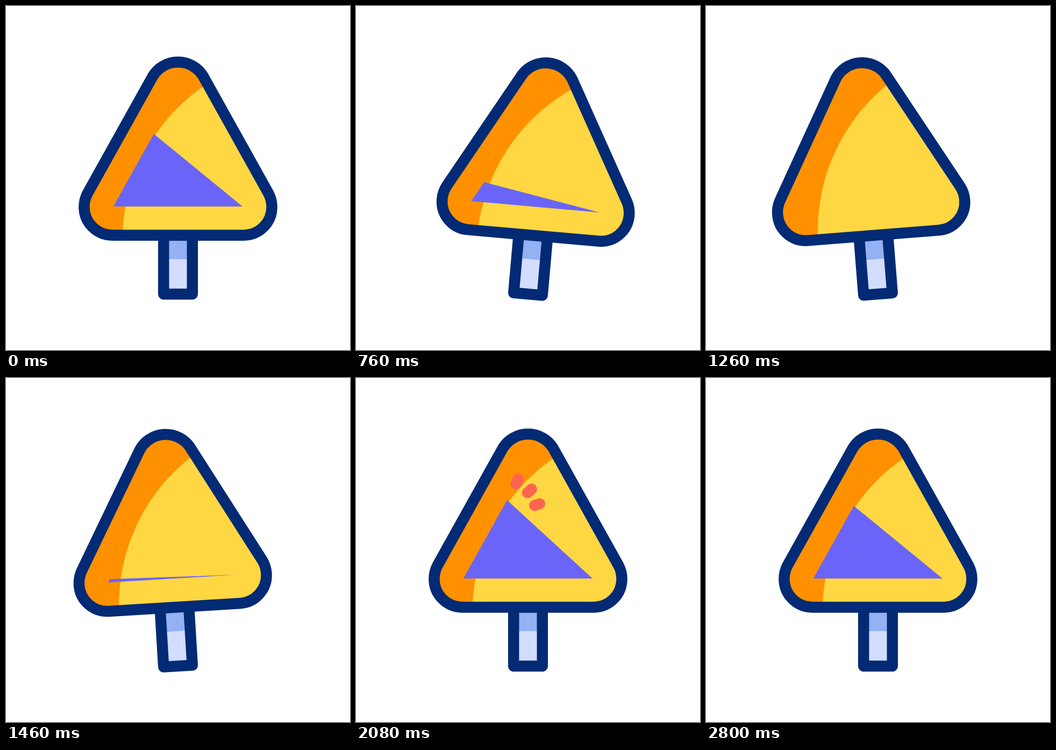
An HTML page with a canvas for the animation above (3 s loop, 640 px wide and 640 px high).

```html
<!DOCTYPE html>
<html lang="en">
<head>
<meta charset="utf-8">
<title>Hill sign</title>
<style>
  html, body { margin: 0; width: 100%; height: 100%; overflow: hidden; background: #fff; }
  canvas { display: block; width: 640px; height: 640px; }
</style>
</head>
<body>
<canvas id="stage" width="640" height="640"></canvas>
<script>
const ctx = document.getElementById('stage').getContext('2d');
const LOOP = 3000, STEP = 20, LINE = 20.5;
const NAVY = '#032a74', ORANGE = '#ff9100', YELLOW = '#ffd743', PURPLE = '#6a65f8';
const RED = '#ff6450', BLUE = '#94b1f3', PALE = '#d3ddff';
const PIVOT = { x: 320, y: 536 };

// [time, value] pairs, joined by a monotone cubic
const tilt = track([
  [100, 0], [370, 1.2], [640, 3.85], [760, 5.03], [930, 6.45], [1080, 2.22], [1180, -1.65],
  [1310, -5.35], [1460, -3.47], [1710, 2.35], [1800, 0.45], [1890, -1.65], [2060, 0]
]);
const slope = track([
  [100, 1], [430, 0.76], [760, 0.277], [1080, 0.02], [1180, 0], [1300, 0], [1460, 0.045],
  [1800, 0.433], [1940, 0.71], [2080, 1.08], [2110, 1.1], [2800, 1]
]);
const sparkTip = track([[2000, 65], [2240, 104]]);
const sparkTail = track([[2260, 65], [2520, 104]]);

function track(keys) {
  const rate = i => (keys[i + 1][1] - keys[i][1]) / (keys[i + 1][0] - keys[i][0]);
  const slopes = keys.map((key, i) => {
    if (i === 0 || i === keys.length - 1) return 0;
    const a = rate(i - 1), b = rate(i);
    return a * b > 0 ? 2 * a * b / (a + b) : 0;
  });
  return t => {
    if (t <= keys[0][0]) return keys[0][1];
    const i = keys.findIndex(key => key[0] > t) - 1;
    if (i < 0) return keys[keys.length - 1][1];
    const span = keys[i + 1][0] - keys[i][0], u = (t - keys[i][0]) / span, v = 1 - u;
    return keys[i][1] * v * v * (1 + 2 * u) + keys[i + 1][1] * u * u * (3 - 2 * u)
      + span * u * v * (slopes[i] * v - slopes[i + 1] * u);
  };
}

const board = new Path2D(
  'M273.5 130 A54.9 54.9 0 0 1 366.5 130 L488 348 Q494.6 360 494.6 374' +
  'A52.4 52.4 0 0 1 442.2 426.4 H197.8 A52.4 52.4 0 0 1 145.4 374 Q145.4 360 152 348 Z');

function drawPole() {
  ctx.fillStyle = PALE;
  ctx.fillRect(293, 426, 54, 110);
  ctx.fillStyle = BLUE;
  ctx.fillRect(293, 426, 54, 45);
  ctx.strokeStyle = NAVY;
  ctx.strokeRect(293.2, 426, 53.6, 110);
}

function drawBoard() {
  ctx.save();
  ctx.clip(board);
  ctx.fillStyle = ORANGE;
  ctx.fillRect(130, 90, 380, 350);
  ctx.fillStyle = YELLOW;
  ctx.beginPath();
  ctx.arc(566, 437, 349.5, 0, 2 * Math.PI);
  ctx.fill();
  ctx.restore();
  ctx.strokeStyle = NAVY;
  ctx.stroke(board);
}

function drawHill(size) {
  if (size <= 0) return;
  ctx.fillStyle = PURPLE;
  ctx.beginPath();
  ctx.moveTo(440, 373);
  ctx.lineTo(199.7, 373);
  ctx.lineTo(199.7 + 75.3 * size, 373 - 135 * size);
  ctx.fill();
}

function drawSparks(tail, tip) {
  if (tip - tail < 0.1) return;
  ctx.strokeStyle = RED;
  for (const degrees of [-65, -41, -17]) {
    const a = degrees * Math.PI / 180, cos = Math.cos(a), sin = Math.sin(a);
    ctx.beginPath();
    ctx.moveTo(270 + tail * cos, 256 + tail * sin);
    ctx.lineTo(270 + tip * cos, 256 + tip * sin);
    ctx.stroke();
  }
}

function render(t) {
  ctx.fillStyle = '#fff';
  ctx.fillRect(0, 0, 640, 640);
  ctx.save();
  ctx.lineWidth = LINE;
  ctx.lineJoin = ctx.lineCap = 'round';
  ctx.translate(PIVOT.x, PIVOT.y);
  ctx.rotate(tilt(t) * Math.PI / 180);
  ctx.translate(-PIVOT.x, -PIVOT.y);
  drawPole();
  drawBoard();
  drawHill(slope(t));
  drawSparks(sparkTail(t), sparkTip(t));
  ctx.restore();
}

function tick() {
  const t = performance.now() % LOOP;
  render(Math.floor(t / STEP) * STEP);
  requestAnimationFrame(tick);
}
tick();
</script>
</body>
</html>
```
